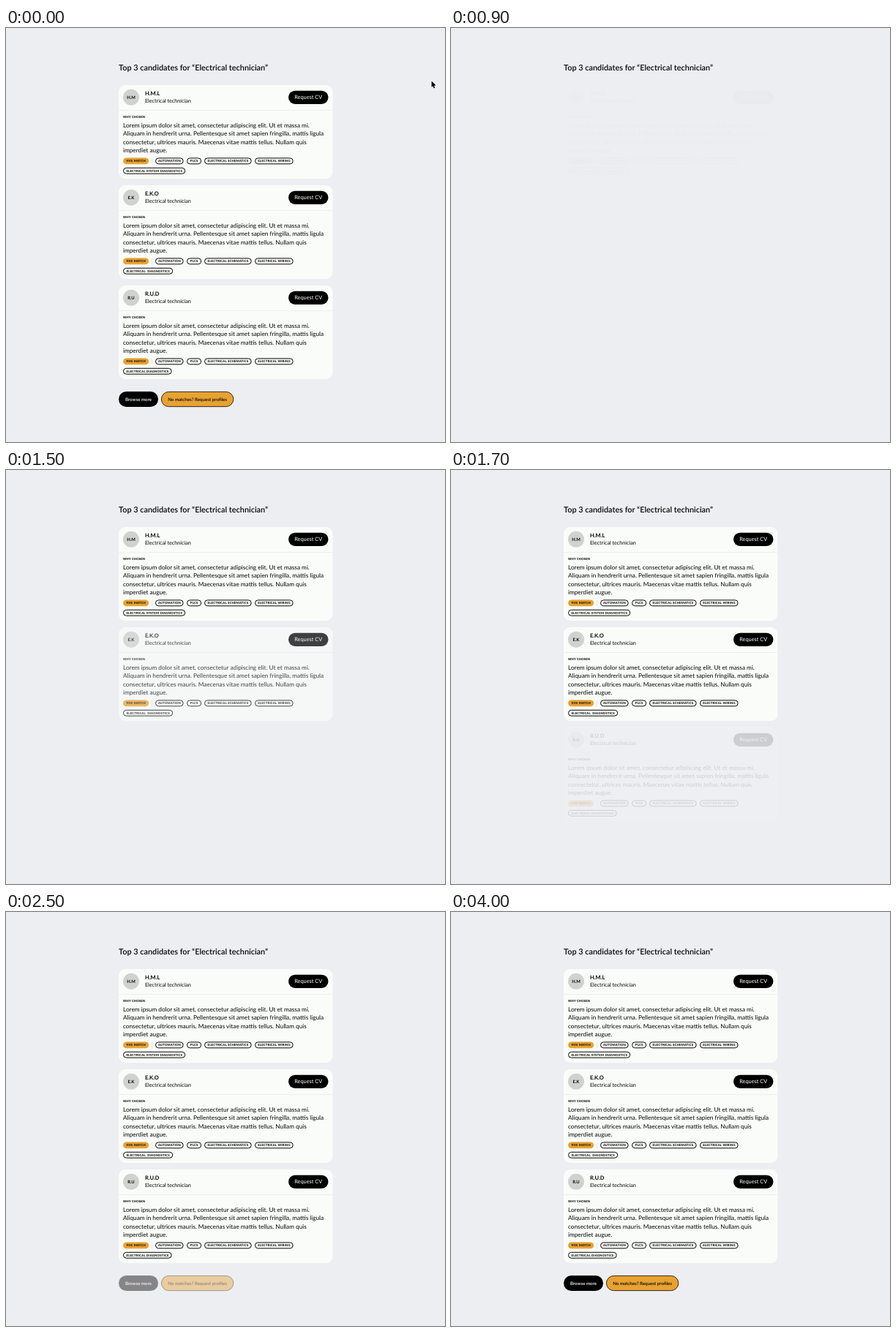
Animation, 600 px wide and 566 px high, one loop 4.1 s. Source, as an HTML page with a canvas:

```html
<!DOCTYPE html>
<html lang="en">
<head>
<meta charset="utf-8">
<title>Candidates</title>
<style>
  html, body { margin: 0; width: 100%; height: 100%; overflow: hidden; background: #edeef2; }
  canvas { display: block; }
</style>
</head>
<body>
<canvas id="stage" width="600" height="566"></canvas>
<script>
const W = 600, H = 566, LOOP = 4100, STEP = 100;
const INK = '#050505', PAPER = '#fafcf9', ORANGE = '#e8a232', BACK = '#edeef2';
const stage = document.getElementById('stage').getContext('2d');

const LOREM = [
  'Lorem ipsum dolor sit amet, consectetur adipiscing elit. Ut et massa mi.',
  'Aliquam in hendrerit urna. Pellentesque sit amet sapien fringilla, mattis ligula',
  'consectetur, ultrices mauris. Maecenas vitae mattis tellus. Nullam quis',
  'imperdiet augue.'
];
const TAGS = [
  [204, 38.5, 'AUTOMATION'],
  [247, 20, 'PLCS'],
  [271, 64.5, 'ELECTRICAL SCHEMATICS'],
  [340, 52.5, 'ELECTRICAL WIRING']
];
const CARDS = [
  { name: 'H.M.L', extra: 'ELECTRICAL SYSTEM DIAGNOSTICS', extraWidth: 85 },
  { name: 'E.K.O', extra: 'ELECTRICAL  DIAGNOSTICS', extraWidth: 68 },
  { name: 'R.U.D', extra: 'ELECTRICAL DIAGNOSTICS', extraWidth: 66.5 }
];

function layer(draw) {
  const canvas = document.createElement('canvas');
  canvas.width = W;
  canvas.height = H;
  draw(canvas.getContext('2d'));
  return canvas;
}

function text(c, str, x, y, size, { weight = 400, color = INK, align = 'left', spacing = 0 } = {}) {
  c.font = `${weight} ${size}px Lato, "Open Sans", sans-serif`;
  c.textRendering = 'geometricPrecision';
  c.letterSpacing = spacing + 'px';
  c.textAlign = align;
  c.fillStyle = color;
  c.fillText(str, x, y);
}

function box(c, x, y, w, h, r, fill, stroke, line = 1) {
  c.beginPath();
  c.roundRect(x, y, w, h, r);
  if (fill) {
    c.fillStyle = fill;
    c.fill();
  }
  if (stroke) {
    c.strokeStyle = stroke;
    c.lineWidth = line;
    c.stroke();
  }
}

function tag(c, x, y, w, label, fill, stroke) {
  box(c, x + 0.5, y + 0.4, w - 0.8, 7.9, 4, fill, stroke, 1);
  text(c, label, x + w / 2 + 0.2, y + 5.8, 4.25, { weight: 800, align: 'center', spacing: 0.18 });
}

function drawCard(c, { name, extra, extraWidth }) {
  box(c, 154, 78, 292.5, 128, 9, PAPER);
  c.fillStyle = '#eceeef';
  c.fillRect(154, 112, 292.5, 1);

  c.beginPath();
  c.arc(171, 94.8, 11, 0, Math.PI * 2);
  c.fillStyle = '#d0d2d0';
  c.fill();
  text(c, name.slice(0, 3), 171, 96.7, 5.9, { weight: 700, align: 'center' });
  text(c, name, 190, 91.7, 7.5, { weight: 700 });
  text(c, 'Electrical technician', 190, 102, 7.2);

  box(c, 386, 85.7, 54.5, 18.2, 9.1, '#000');
  text(c, 'Request CV', 413.2, 97.3, 7.4, { color: '#fff', align: 'center' });

  text(c, 'WHY CHOSEN', 160, 122.6, 4.25, { weight: 800, spacing: 0.12 });
  LOREM.forEach((line, i) => text(c, line, 160, 136 + i * 11.25, 8.24));

  tag(c, 160, 177.5, 35, '95% MATCH', ORANGE, ORANGE);
  c.fillStyle = '#d9dbda';
  c.fillRect(199, 178, 0.8, 8);
  for (const [x, w, label] of TAGS) tag(c, x, 177.5, w, label, null, INK);
  tag(c, 160, 190.9, extraWidth, extra, null, INK);
}

function drawButtons(c) {
  box(c, 154, 497, 54, 21, 10.5, '#000');
  text(c, 'Browse more', 181, 509.6, 6.2, { weight: 600, color: '#fff', align: 'center' });
  box(c, 212.4, 497.4, 98.4, 20.2, 10.1, ORANGE, '#1c1609', 0.9);
  text(c, 'No matches? Request profiles', 261.6, 509.6, 6.2, { weight: 600, align: 'center' });
}

function drawCursor(c) {
  c.save();
  c.translate(581.6, 72.5);
  c.beginPath();
  [[0, 0], [0, 8.6], [1.9, 6.9], [3.2, 9.9], [4.7, 9.2], [3.4, 6.3], [6, 6.1]]
    .forEach(([x, y]) => c.lineTo(x, y));
  c.closePath();
  c.strokeStyle = '#fff';
  c.lineWidth = 1.2;
  c.stroke();
  c.fillStyle = '#000';
  c.fill();
  c.restore();
}

const backdrop = layer(c => {
  c.fillStyle = BACK;
  c.fillRect(0, 0, W, H);
  text(c, 'Top 3 candidates for “Electrical technician”', 154, 58.3, 10.9, { weight: 600 });
});

// Each group fades in from its own start time.
const starts = [896, 1280, 1660];
const groups = CARDS.map((card, i) => ({
  start: starts[i],
  image: layer(c => {
    c.translate(0, i * 137);
    drawCard(c, card);
  })
}));
groups.push({ start: 2370, image: layer(drawButtons) });

const ramp = (t, start, length) => Math.min(1, Math.max(0, (t - start) / length));

function render(t) {
  stage.globalAlpha = 1;
  stage.drawImage(backdrop, 0, 0);
  const leaving = 1 - ramp(t, 20, 380);
  for (const { start, image } of groups) {
    stage.globalAlpha = Math.max(leaving, ramp(t, start, 300));
    stage.drawImage(image, 0, 0);
  }
  stage.globalAlpha = 1;
  if (t < 200) drawCursor(stage);
}

const origin = performance.now();
function tick() {
  const t = (performance.now() - origin) % LOOP;
  render(Math.floor(t / STEP) * STEP);
  requestAnimationFrame(tick);
}
tick();
</script>
</body>
</html>
```
